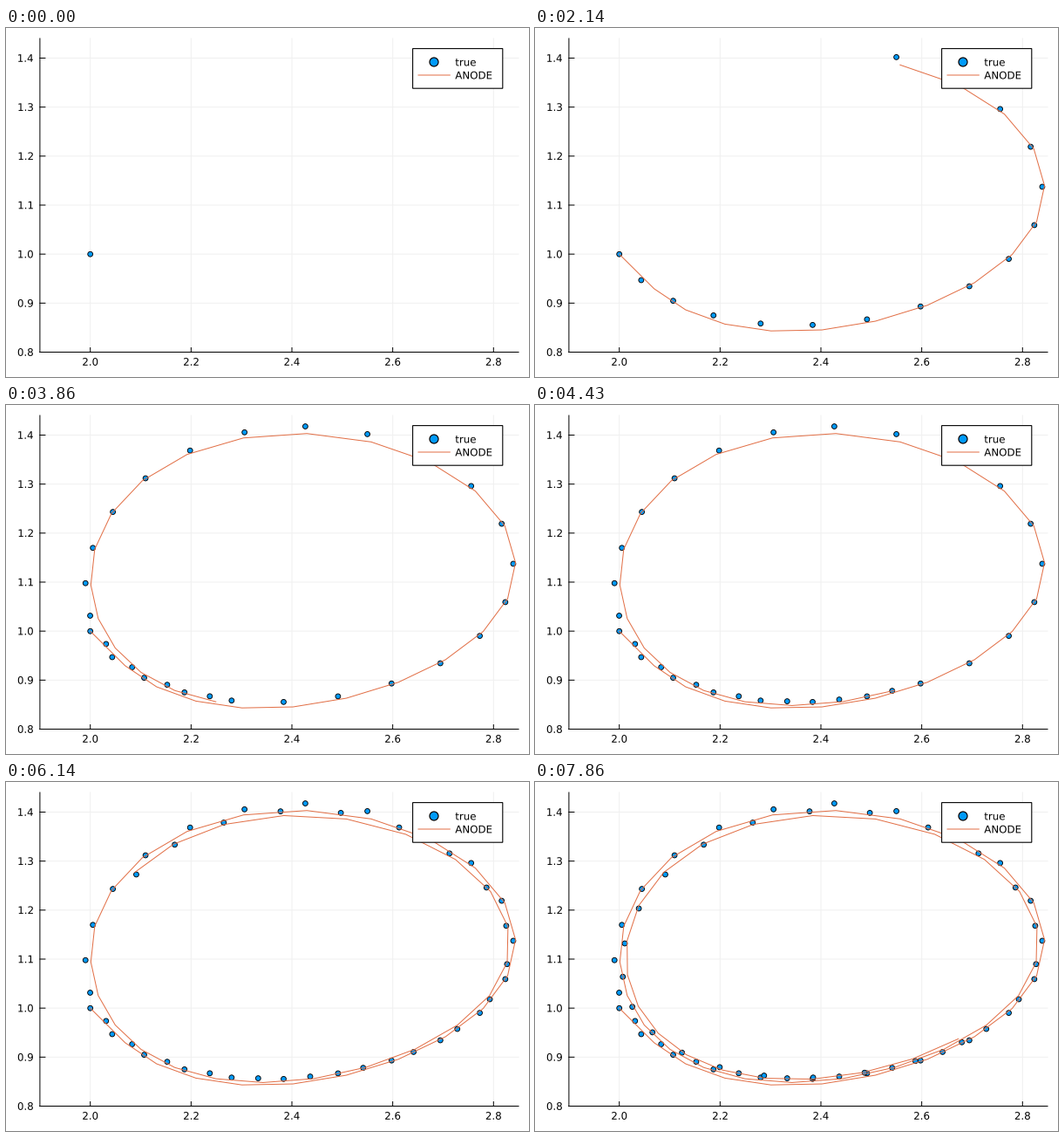
A matplotlib script for the animation above (8 s loop, 600 by 400 pixels).

```python
import numpy as np
import matplotlib.pyplot as plt
from matplotlib.animation import FuncAnimation
from matplotlib.patches import Circle, PathPatch, Rectangle
from matplotlib.textpath import TextPath
from matplotlib.transforms import Affine2D

W, H, DPI = 600, 400, 100
LOOP, TICK = 8000, 20              # ms
STEPS = 56
PX = 72 / DPI                      # one pixel in points
BLUE, ORANGE, GRID = "#009AFA", "#E26F46", "#f0f0f0"
LEFT, RIGHT, TOP, BOTTOM = 38.9, 588, 12, 371.5
START = (96.7, 259.2)
DECAY = 0.0012


def basis(t, period):
    """Constant, slow drift and three damped harmonics."""
    t = np.asarray(t, float)
    angle, damp = 2 * np.pi * t / period, np.exp(-DECAY * t)
    cols = [np.ones_like(t), damp ** 2]
    for k in (1, 2, 3):
        cols += [damp ** k * np.cos(k * angle), damp ** k * np.sin(k * angle)]
    return np.stack(cols, axis=1)


def spiral(period, first, keys):
    """Damped orbit through key points that lie five steps apart."""
    at = first + 5 * np.arange(len(keys))
    coef = np.linalg.lstsq(basis(at, period), np.array(keys), rcond=None)[0]
    path = basis(np.arange(STEPS), period) @ coef
    path[0] = START
    return path


true_path = spiral(23.55, 0, [
    START, (318.8, 340.6), (572.5, 225.7), (414.3, 33), (122.6, 122.4),
    (144.5, 300.5), (409.4, 327.5), (574.2, 165.1), (315.2, 34),
    (102.8, 185), (211.8, 326.6), (490, 298.3)])
model_path = spiral(23.62, 5, [
    (328, 346), (574, 222), (421, 42), (124, 124), (155.5, 306.5),
    (412, 327.5), (576, 166), (316, 38.8), (103, 182), (215.5, 330),
    (488, 294)])

fig = plt.figure(figsize=(W / DPI, H / DPI), dpi=DPI, facecolor="white")
ax = fig.add_axes([0, 0, 1, 1])
ax.set_xlim(0, W)
ax.set_ylim(H, 0)
ax.axis("off")


def rule(x, y, color="black", z=2):
    return ax.plot(x, y, color=color, lw=PX, zorder=z, snap=False)[0]


def label(x, y, text, align=0.0, z=3):
    """Text outline; align 0, 0.5 or 1 puts its left, middle or right at x."""
    path = TextPath((0, 0), text, size=11.8)
    x -= align * path.get_extents().x1 + (0.4 if align == 0.5 else 0)
    place = Affine2D().scale(1, -1).translate(x, y)
    ax.add_patch(PathPatch(place.transform_path(path), fc="black", lw=0,
                           zorder=z, snap=False))


def dot(x, y, radius, edge, z):
    return ax.add_patch(Circle((x, y), radius, fc=BLUE, ec="black",
                               lw=edge * PX, zorder=z, snap=False))


# Grid, ticks and axes
for i in range(5):
    x = START[0] + 115.65 * i
    rule([x, x], [TOP, BOTTOM], GRID, 1)
    rule([x, x], [BOTTOM, BOTTOM - 5])
    label(x, 386.8, f"{2 + 0.2 * i:.1f}", 0.5)
for i in range(7):
    y = BOTTOM - 56.17 * i
    if i:
        rule([LEFT, RIGHT], [y, y], GRID, 1)
    rule([LEFT, LEFT + 6], [y, y])
    label(30.9, y + 4.3, f"{0.8 + 0.1 * i:.1f}", 1)
rule([LEFT, RIGHT], [BOTTOM, BOTTOM])
rule([LEFT, LEFT], [TOP, BOTTOM])

# Legend
ax.add_patch(Rectangle((466.6, 23.6), 103.2, 45.6, fc="white", ec="black",
                       lw=1.1 * PX, zorder=6, snap=False))
dot(491, 39, 5, 1.2, 7)
rule([473, 509.3], [54, 54], ORANGE, 7)
label(515.3, 43.4, "true", z=7)
label(515.3, 58.4, "ANODE", z=7)

true_dots = [dot(x, y, 2.9, 0.9, 4) for x, y in true_path]
model_line = rule([], [], ORANGE, 5)


def draw(tick):
    # half-tick lead: step times are rounded to whole hundredths of a second
    step = int((tick * TICK + 5) * 7 / 1000)
    for k, d in enumerate(true_dots):
        d.set_visible(k <= step)
    model_line.set_data(*model_path[:step + 1].T)
    return [*true_dots, model_line]


anim = FuncAnimation(fig, draw, frames=LOOP // TICK, interval=TICK,
                     repeat=True, repeat_delay=0)
plt.show()
```
